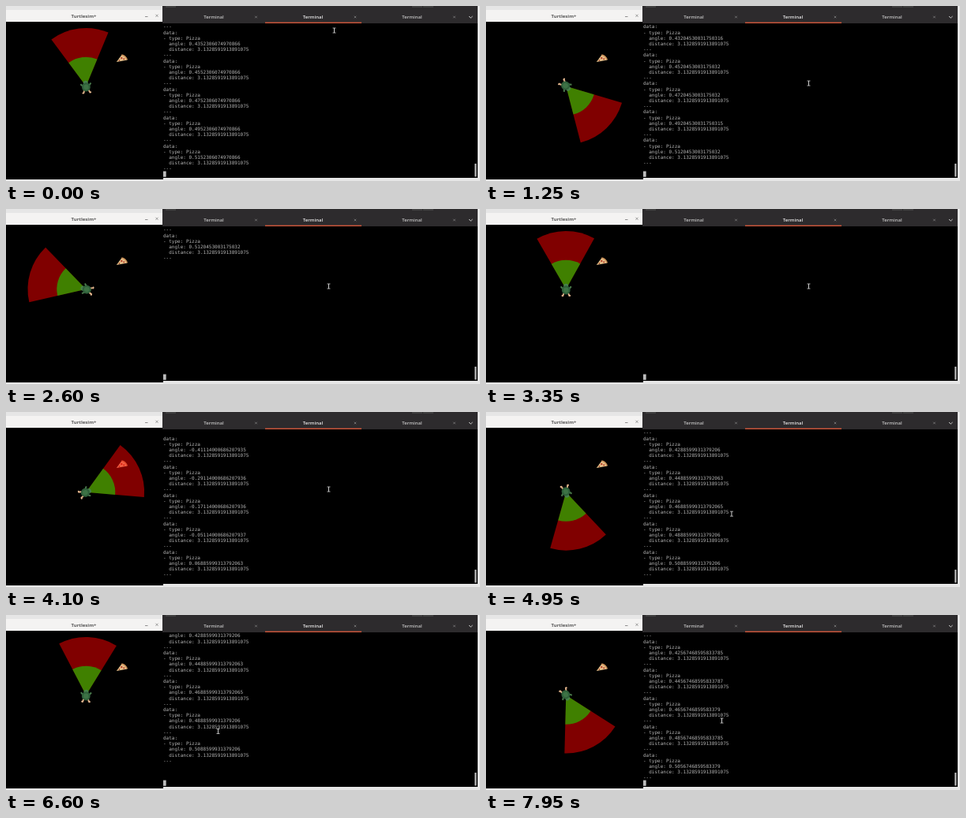
An HTML page with a canvas that plays this animation: 600 px wide and 222 px high, repeating every 8 s.

```html
<!DOCTYPE html>
<html lang="en">
<head>
<meta charset="utf-8">
<title>Turtle field of view</title>
<style>
html, body { margin: 0; width: 100%; height: 100%; overflow: hidden; background: #e6e6e6; }
canvas { display: block; }
</style>
</head>
<body>
<canvas id="stage" width="600" height="222"></canvas>
<script>
const g = document.getElementById('stage').getContext('2d');
const LOOP = 8000, LAG = 95, STALL = 150, DEG = Math.PI / 180;
const SANS = '"Open Sans", "Noto Sans", sans-serif';
const MONO = '"DejaVu Sans Mono", monospace';

// [time, degrees turned clockwise]
const turn = [[0, 0], [1250, 143], [2900, 327], [4100, 432.4], [6600, 729], [7950, 879]];
// [start, duration, from, to]
const glides = [[150, 300, [415, 31], [408, 98]], [4100, 1350, [408, 98], [253, 147.5]],
  [5850, 450, [253, 147.5], [268, 147.5]], [6600, 400, [268, 147.5], [298, 134]]];
// the picture freezes for a moment at these times
const stalls = [0, 500, 750, 1100, 4550, 7000, 7250];

function lerp(keys, x) {
  if (x <= keys[0][0]) return keys[0][1];
  for (let i = 1; i < keys.length; i++) {
    const [a, va] = keys[i - 1], [b, vb] = keys[i];
    if (x <= b) return va + (vb - va) * (x - a) / (b - a);
  }
  return keys[keys.length - 1][1];
}

// ---- terminal log: [time, text]
const log = [[0, '---']];
const timeOf = turn.map(([t, a]) => [a, t]);

function report(t, angle) {
  for (const s of ['data:', '- type: Pizza', '  angle: ' + angle,
    '  distance: 3.1328591913891075', '---']) log.push([t, s]);
}

// readings while the pizza is in view: coarse steps first, then fine ones
function sweep(lap, last) {
  const at = a => report(lerp(timeOf, 59.7 + a / DEG + 360 * lap) + LAG, a);
  for (let k = 4; k > 0; k--) at(last - 0.44 - 0.12 * k);
  for (let k = 22; k >= 0; k--) at(last - 0.02 * k);
}

function pressEnter(from, gap, count) {
  for (let i = 0; i < count; i++) log.push([from + gap * i, '']);
}

for (let k = 4; k >= 0; k--) report(0, 0.5152306074970866 - 0.02 * k);
sweep(0, 0.5120453003175032);
pressEnter(1250, 71, 26);
sweep(1, 0.5088599931379206);
pressEnter(5900, 200, 3);
sweep(2, 0.5056746859583379);

// ---- drawing helpers
function rect(color, x, y, w, h) {
  g.fillStyle = color;
  g.fillRect(x, y, w, h);
}

function text(s, x, y, font, color, align = 'center') {
  g.font = font;
  g.fillStyle = color;
  g.textAlign = align;
  g.fillText(s, x, y);
}

function line(color, width, ...pts) {
  g.strokeStyle = color;
  g.lineWidth = width;
  g.beginPath();
  for (let i = 0; i < pts.length; i += 2) g.lineTo(pts[i], pts[i + 1]);
  g.stroke();
}

function oval(color, x, y, rx, ry = rx) {
  g.fillStyle = color;
  g.beginPath();
  g.ellipse(x, y, rx, ry, 0, 0, 7);
  g.fill();
}

function cross(x, y, r, color) {
  line(color, 0.7, x - r, y - r, x + r, y + r);
  line(color, 0.7, x - r, y + r, x + r, y - r);
}

function sector(color, r) {
  g.fillStyle = color;
  g.beginPath();
  g.moveTo(0, 0);
  g.arc(0, 0, r, -29.5 * DEG, 29.5 * DEG);
  g.fill();
}

function pizza() {
  g.fillStyle = '#e6c08a';
  g.beginPath();
  g.moveTo(139.8, 71);
  g.lineTo(146.5, 62);
  g.quadraticCurveTo(151.5, 63, 153.5, 68.5);
  g.fill();
  g.strokeStyle = '#c98f56';
  g.lineWidth = 1.6;
  g.beginPath();
  g.moveTo(146.3, 62);
  g.quadraticCurveTo(151.5, 63, 153.3, 68.3);
  g.stroke();
  oval('#b5442d', 146.3, 66, 1.2);
  oval('#b5442d', 149.3, 67.3, 1.1);
  oval('#a5502f', 143.5, 69, 0.9);
}

function turtle(heading) {
  g.save();
  g.translate(101.3, 101.8);
  g.rotate(-heading * DEG);
  sector('rgba(255,0,0,.5)', 73.8);
  sector('rgba(0,255,0,.5)', 37);
  for (const s of [-1, 1]) {
    line('#4a7a4c', 2, 0, s * 3.5, 3.5, s * 6.6);
    line('#dfae84', 2, -5, s * 2.8, -7.6, s * 3.8);
    oval('#e6b890', -8.2, s * 4.4, 1.1, 1.5);
  }
  oval('#47804c', 4.2, 0, 2.8, 3);
  oval('#2f5f3a', -1, 0, 5.6, 5.4);
  oval('#3d7245', -1, 0, 3.4, 3.2);
  g.restore();
}

function simWindow(heading) {
  rect('#f4f3f2', 0, 5, 198, 15);
  text('Turtlesim+', 98.5, 14.6, '700 6px ' + SANS, '#555');
  line('#777', 0.8, 176, 13.5, 179.5, 13.5);
  cross(191, 12.3, 1.6, '#777');
  rect('#000', 0, 20, 199, 200);
  pizza();
  turtle(heading);
}

function terminal(lines, caret) {
  rect('#2d2b2d', 198, 0, 399, 22);
  rect('#000', 198, 22, 399, 196);
  for (const x of [202, 514, 528]) rect('#414141', x, 0, 13, 2);
  for (let i = 0; i < 3; i++) {
    const x = 263 + 125.5 * i;
    text('Terminal', x, 16.2, '600 6px ' + SANS, i == 1 ? '#eee' : '#c8c8c8');
    cross(x + 53.5, 14, 1.3, '#888');
  }
  rect('#c9553a', 328, 20.5, 122, 1.5);
  line('#ccc', 1, 586, 13, 588.3, 15.2, 590.6, 13);

  lines.slice(-26).forEach((s, i) =>
    text(s, 199, 28.3 + i * 7.2, '6px ' + MONO, '#b4b4b4', 'left'));
  if (caret) rect('#bbb', 199, 209.6, 3.7, 7.2);
  rect('#bbb', 593.3, 200, 2.2, 16.5);
}

function pointer(t) {
  const [start, time, from, to] = glides.findLast(m => m[0] <= t) || glides[0];
  const p = Math.min(1, Math.max(0, (t - start) / time));
  const [x, y] = from.map((v, i) => v + (to[i] - v) * p);
  line('#d0d0d0', 1, x + 0.5, y - 3, x + 0.5, y + 3);
  for (const d of [-3, 3]) line('#d0d0d0', 0.8, x - 1.5, y + d, x + 2.5, y + d);
}

function frame(now) {
  let t = Math.floor(now % LOOP / 50) * 50;
  t = stalls.find(s => t >= s && t < s + STALL) ?? t;
  const shown = log.filter(e => e[0] <= t);
  const lastKey = shown.findLast(e => !e[1])?.[0] ?? -200;

  rect('#e6e6e6', 0, 0, 600, 222);
  simWindow(97 - lerp(turn, t));
  terminal(shown.map(e => e[1]), (t - lastKey) % 1200 < 600);
  pointer(t);
}

const start = performance.now();
function tick() {
  frame(performance.now() - start);
  requestAnimationFrame(tick);
}
tick();
</script>
</body>
</html>
```
